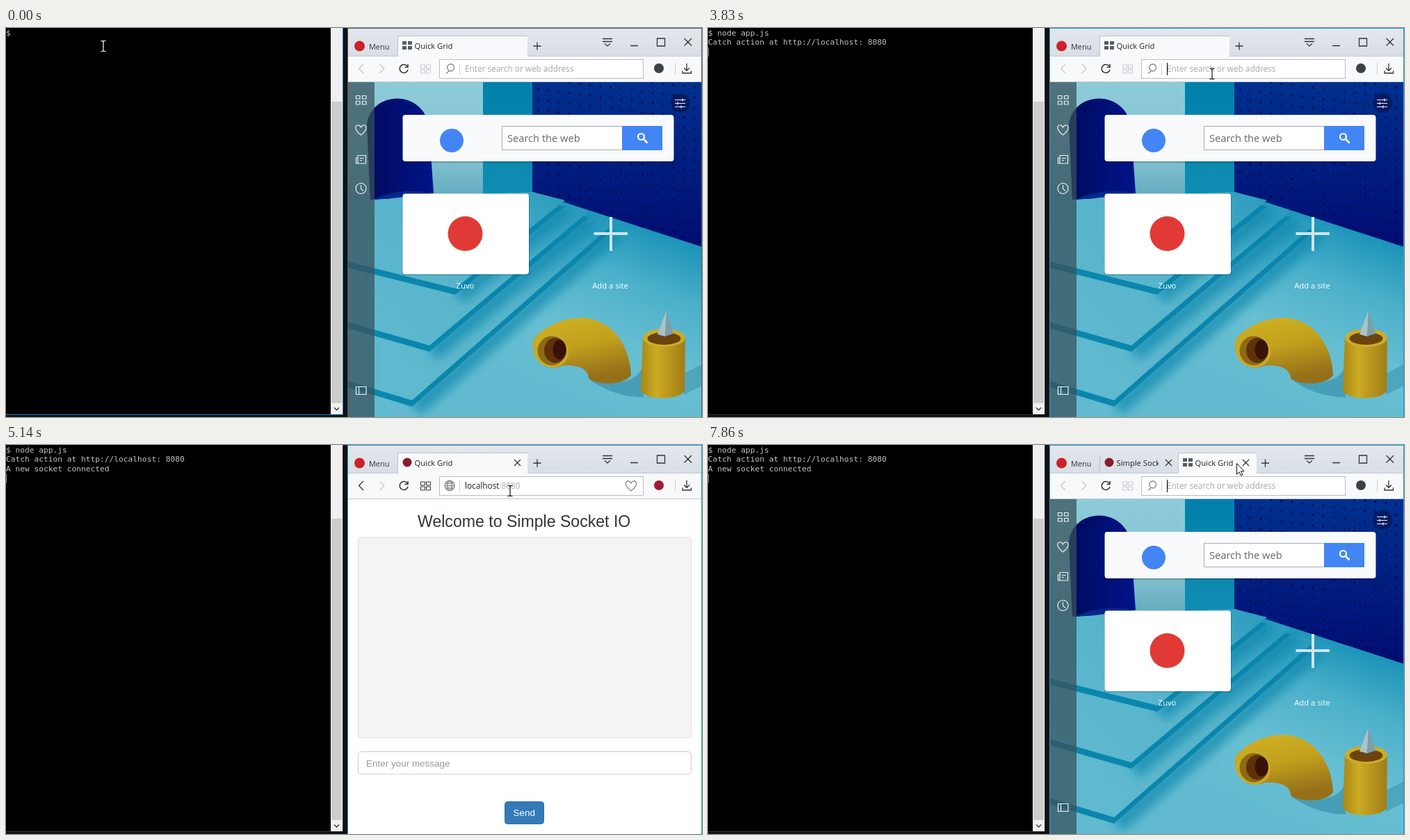
Write an HTML page that moves like this. It is 1001 by 560 pixels and loops after 8000 ms.

```html
<!DOCTYPE html>
<html lang="en">
<head>
<meta charset="utf-8">
<title>Simple Socket IO</title>
<style>
  html, body { margin: 0; width: 100%; height: 100%; overflow: hidden; background: #111; }
  svg { display: block; }
  text { font-family: "Open Sans", "Noto Sans", sans-serif; white-space: pre; }
  .mono { font: 11.23px "DejaVu Sans Mono", monospace; fill: #c4c4c4; }
  .tab { font-size: 11.2px; fill: #222; }
  .url { font-size: 11.8px; }
  .page text { font-family: "Liberation Sans", Arial, sans-serif; }
  .line { fill: none; stroke: #333; stroke-width: 1.3; }
  .side { fill: none; stroke: #e8f0f2; stroke-width: 1.2; }
</style>
</head>
<body>
<svg width="1001" height="560">
  <defs>
    <linearGradient id="bar" x2="0" y2="1"><stop stop-color="#e3e8ee"/><stop offset="1" stop-color="#d8dee5"/></linearGradient>
    <linearGradient id="floor" gradientUnits="userSpaceOnUse" x1="925" y1="285" x2="815" y2="560">
      <stop stop-color="#1b93b8"/><stop offset=".28" stop-color="#4bb0ca"/><stop offset=".6" stop-color="#68bfd2"/><stop offset="1" stop-color="#62bad0"/>
    </linearGradient>
    <linearGradient id="stair" gradientUnits="userSpaceOnUse" x1="800" y1="235" x2="560" y2="480">
      <stop stop-color="#2b9bbd"/><stop offset=".45" stop-color="#55b3cb"/><stop offset="1" stop-color="#5fb9cf"/>
    </linearGradient>
    <linearGradient id="wallPale" x2="0" y2="1"><stop stop-color="#8ecbd8"/><stop offset=".6" stop-color="#86c4d2"/><stop offset="1" stop-color="#5fa9bd"/></linearGradient>
    <linearGradient id="arch"><stop stop-color="#000a5c"/><stop offset="1" stop-color="#00148a"/></linearGradient>
    <linearGradient id="navy" x2="0" y2="1"><stop stop-color="#00308f"/><stop offset="1" stop-color="#000c72"/></linearGradient>
    <linearGradient id="teal" x2="0" y2="1"><stop stop-color="#0080aa"/><stop offset="1" stop-color="#108db1"/></linearGradient>
    <linearGradient id="gold" x2=".3" y2="1"><stop stop-color="#d0b224"/><stop offset=".5" stop-color="#c2a11d"/><stop offset="1" stop-color="#957019"/></linearGradient>
    <linearGradient id="can"><stop stop-color="#a88718"/><stop offset=".35" stop-color="#cbab22"/><stop offset="1" stop-color="#a17c18"/></linearGradient>
    <filter id="soft"><feGaussianBlur stdDeviation="7"/></filter>
    <pattern id="dots" width="15" height="15" patternUnits="userSpaceOnUse" patternTransform="translate(758 80) skewY(7)">
      <circle cx="7" cy="7" r="1.700" fill="#000a42"/>
    </pattern>
    <path id="grid" d="M0 0h6v5h-6zM8 0h6v5h-6zM0 7h6v5h-6zM8 7h6v5h-6z"/>
    <path id="lens" d="M-1.5 4A5 5 0 1 1 2 4.3 5 5 0 0 1 -1.5 4L-6 8" fill="none"/>
    <path id="heart" d="M0 7C-15 -4 -4 -12 0 -4C4 -12 15 -4 0 7z"/>
  </defs>

  <!-- terminal -->
  <rect width="484" height="556"/>
  <path d="M467 0h17v556h-17z" fill="#f0f0f0"/>
  <path d="M468 106h15v434h-15z" fill="#cdcdcd"/>
  <path d="M472 546.5l3.5 3.5 3.5-3.5" class="line" stroke-width="2"/>
  <path id="termEdge" d="M484.5 0V556.5H0" fill="none"/>
  <text class="mono" y="10.5" id="cmd"></text>
  <text class="mono" y="24" id="out">Catch action at http://localhost: 8080</text>
  <text class="mono" y="37.5" id="conn">A new socket connected</text>
  <rect id="termCaret" width="1" height="13"/>

  <!-- browser frame -->
  <rect x="491" width="510" height="560" fill="#fff"/>
  <rect x="491" width="510" height="41" fill="url(#bar)"/>
  <rect x="491" y="40" width="510" height="38" fill="#f8f9fb"/>
  <path d="M491 40.5h510M491 77.5h510" stroke="#c3c9cf"/>
  <circle cx="508.500" cy="26" r="7.500" fill="#cc2229"/>
  <text x="522" y="30.500" font-size="10.9" fill="#333">Menu</text>
  <rect id="hover" x="750" y="11" width="29" height="29" fill="#b7bec5"/>
  <svg id="tabA" x="563" y="11" height="30">
    <path d="M.5 4V27" stroke="#b5bcc4"/>
    <rect id="tabABack" x=".5" y=".5" width="100%" height="34" fill="#f8f9fb" stroke="#bcc3ca"/>
    <use href="#grid" x="7" y="8" fill="#555d63" id="tabAGrid"/>
    <circle cx="14" cy="14" r="6.500" fill="#8b1a2b" id="tabADot"/>
    <svg id="clipA" height="30"><text id="titleA" class="tab" x="24.500" y="19"></text></svg>
    <svg x="100%" overflow="visible" id="closeA"><path d="M-19 10l9 9m0-9l-9 9" class="line"/></svg>
  </svg>
  <svg id="tabB" y="11" height="30">
    <rect x=".5" y=".5" width="100%" height="34" fill="#f8f9fb" stroke="#bcc3ca"/>
    <use href="#grid" x="7" y="8" fill="#555d63"/>
    <text class="tab" x="24.500" y="19">Quick Grid</text>
    <svg x="100%" overflow="visible"><path d="M-20 10l9 9m0-9l-9 9" class="line"/></svg>
  </svg>
  <path id="plus" d="M-5.500 26h11M0 20.500v11" class="line"/>
  <path d="M858 15.500h14M858 19.500h14M861 22.500l4 3.500 4-3.500M898 25.500h11M936.500 15h11v11h-11zM975.500 15l10.500 10.500m0-10.500l-10.500 10.500" class="line"/>

  <!-- toolbar -->
  <path id="back" d="M514 52l-6.500 6.500 6.500 6.500" class="line"/>
  <path d="M537.500 52l6.500 6.500-6.500 6.500" class="line" style="stroke:#c6c9cc"/>
  <path d="M577 55A6 6 0 1 0 578 60M578 52v4.500h-4.500" class="line" style="stroke-width:1.5"/>
  <use id="toolGrid" href="#grid" x="596.500" y="53" fill="none"/>
  <rect x="623.500" y="45.500" width="293" height="27" fill="#fff" stroke="#b9bec3"/>
  <path d="M652.500 51v16M962.500 50v17" stroke="#ccd0d4"/>
  <g class="line" style="stroke:#80868b">
    <use id="icoLens" href="#lens" x="639" y="57.500"/>
    <g id="icoClock"><circle cx="638" cy="58.500" r="7"/><path d="M638 54v5h4"/></g>
    <g id="icoGlobe"><circle cx="638" cy="58.500" r="7"/><ellipse cx="638" cy="58.500" rx="3.300" ry="7"/><path d="M631 58.500h14M632 55h12M632 62h12"/></g>
    <use id="like" href="#heart" x="899" y="59"/>
  </g>
  <circle id="shield" cx="939" cy="58" r="7"/>
  <path d="M979 51v10M975 57.500l4 4 4-4M973 61.500v3.500h12.500v-3.500" class="line"/>
  <rect id="select" y="50" height="18" fill="#0094fb"/>
  <text class="url" x="660" y="63"><tspan id="urlA"></tspan><tspan id="urlB"></tspan></text>
  <rect id="urlCaret" x="660" y="50" width="1" height="18"/>

  <!-- start page -->
  <svg id="start" x="491" y="78" width="509" height="482" viewBox="491 78 509 482">
    <rect x="491" y="78" width="510" height="482" fill="url(#floor)"/>
    <path d="M491 78h196v160l-196 11z" fill="url(#wallPale)"/>
    <path d="M686 78h72v159l-72 4z" fill="url(#teal)"/>
    <path d="M524 249L519 140C523 92 595 86 608 138L615 238Q570 233 524 249z" fill="url(#arch)"/>
    <path d="M524 249Q566 228 615 238z" fill="#04288a"/>
    <path d="M757 78h244v237L757 236z" fill="url(#navy)"/>
    <path d="M764 78h237v237L764 238z" fill="url(#dots)"/>
    <g id="stairs"></g>
    <path d="M838 505Q900 520 915 490L917 532Q870 530 838 505z" fill="#2f87a0" opacity=".55"/>
    <path d="M970 500L1001 484V515L975 528z" fill="#2f87a0" opacity=".45"/>
    <path d="M760 446Q788 418 828 417C874 419 898 460 899 500C888 515 850 515 838 504C838 490 820 484 801 486Q788 492 774 486C758 474 755 458 760 446z" fill="url(#gold)"/>
    <ellipse cx="784" cy="464" rx="26" ry="24" fill="#c9aa26" transform="rotate(35 784 464)"/>
    <ellipse cx="785" cy="464.500" rx="20.500" ry="21" fill="#8f6a14"/>
    <ellipse cx="790" cy="464" rx="16" ry="18" fill="#5f3209"/>
    <ellipse cx="796" cy="463" rx="9.500" ry="14" fill="#381205"/>
    <path d="M916 446L913 522Q920 533 945 533Q971 532 976 522L977 446z" fill="url(#can)"/>
    <ellipse cx="946.500" cy="446" rx="30.500" ry="13" fill="#cbad28"/>
    <ellipse cx="946.500" cy="447" rx="24" ry="9" fill="#6d430d"/>
    <path d="M950 406L937 441 948 444z" fill="#a9c3ca"/>
    <path d="M950 406L948 444 960 440z" fill="#7d9ea8"/>
    <rect x="491" y="78" width="39" height="482" fill="#37525b" opacity=".73"/>
    <g class="side">
      <path d="M503.500 97.500h5.500v4.500h-5.500zM512.500 97.500h5.500v4.500h-5.500zM503.500 105.500h5.500v4.500h-5.500zM512.500 105.500h5.500v4.500h-5.500z"/>
      <use href="#heart" x="510.500" y="147"/>
      <path d="M506 183.500h11.500v11.500h-14v-8h2.500zM506 187v8M509 187.500h5.500M509 190.500h3"/>
      <circle cx="510.500" cy="231" r="7.500"/><path d="M510.500 226v5.500l3.500 3"/>
      <path d="M503.500 516.500h14.500v11h-14.500zM507.500 516.500v11"/>
    </g>
    <circle cx="970" cy="108" r="14" fill="#06164f" opacity=".65"/>
    <path class="side" d="M962 103.500h15M962 108.500h15M962 113.500h15M973 101.500v4M966 106.500v4M971 111.500v4"/>
    <rect x="570" y="126" width="391" height="68" rx="4" opacity=".22"/>
    <rect x="570.500" y="125" width="390" height="67" rx="4" fill="#f8fafc"/>
    <circle cx="641" cy="162" r="17" fill="#4285f4"/>
    <rect x="713.500" y="141.500" width="173" height="34" fill="#fff" stroke="#a9adb1"/>
    <text x="721" y="164" font-size="14.66" fill="#666">Search the web</text>
    <rect x="886" y="141" width="58" height="35" fill="#4285f4"/>
    <path d="M917.500 160.500l5 5" stroke="#fff" stroke-width="2.500"/><circle cx="913.500" cy="156.500" r="4.500" fill="none" stroke="#fff" stroke-width="2.200"/>
    <rect x="570" y="240" width="183" height="116" rx="4" opacity=".22"/>
    <rect x="570.500" y="238.500" width="181.500" height="116" rx="4" fill="#fff"/>
    <circle cx="660.500" cy="296" r="25" fill="#e13a36"/>
    <path d="M845.500 296h48.500M870 272v49" stroke="#cfe5ec" stroke-width="4"/>
    <g font-size="11.25" fill="#fff" text-anchor="middle"><text x="660.500" y="375">Zuvo</text><text x="869" y="375">Add a site</text></g>
  </svg>

  <!-- chat page -->
  <g id="chat" class="page">
    <rect x="491" y="78" width="510" height="482" fill="#fff"/>
    <text x="592" y="118" font-size="23.1" fill="#333">Welcome to Simple Socket IO</text>
    <rect x="506.500" y="133" width="479" height="288.500" rx="4" fill="#f4f4f4" stroke="#dfdfdf"/>
    <rect x="506.500" y="441.500" width="479" height="32.500" rx="4" fill="#fff" stroke="#ccc"/>
    <text x="518" y="462.500" font-size="13.48" fill="#999">Enter your message</text>
    <rect x="717.500" y="513.500" width="56" height="32" rx="4" fill="#337ab7" stroke="#2e6da4"/>
    <text x="729.500" y="534" font-size="13.48" fill="#fff">Send</text>
  </g>
  <path id="browserEdge" d="M491.500 560V.5H1000.500V560" fill="none"/>

  <g id="pointer">
    <path id="beam" d="M-3.500 -7.500H-1L0 -6.500 1 -7.500H3.500M0 -6.500V6.500M-3.500 7.500H-1L0 6.500 1 7.500H3.500" fill="none" stroke-width="1.200"/>
    <path id="arrow" d="M.5 .5V16L4 12.700 6.500 18 9 17 6.500 11.800H11z" fill="#fff" stroke="#111"/>
  </g>
</svg>
<script>
const $ = id => document.getElementById(id);
const set = (id, attrs) => { for (const k in attrs) $(id).setAttribute(k, attrs[k]); };
const show = (id, on) => { $(id).style.display = on ? '' : 'none'; };
const write = (id, s) => { if ($(id).textContent !== s) $(id).textContent = s; };

// stairs, lowest first: back corner, front corner, height at the left edge
$('stairs').innerHTML = [[872, 283, 584, 536, 508], [838, 264, 609, 457, 423], [804, 248, 646, 375, 336]]
  .map(([cx, cy, fx, fy, ly]) => {
    const d = `M491 249L757 236 ${cx} ${cy} ${fx} ${fy} 491 ${ly}z`;
    return `<path d="M${cx} ${cy}L${fx} ${fy}" stroke="#0787ae" stroke-width="22" opacity=".7" transform="translate(5 12)" filter="url(#soft)"/>
      <path d="${d}" fill="#0a86ad" transform="translate(0 9)"/><path d="${d}" fill="url(#stair)"/>`;
  }).join('');

const LOOP = 8000, CHAR = 6.76, COMMAND = 'node app.js', URL_TEXT = 'localhost:8080';
const KEYS = [80, 150, 230, 460, 550, 700, 860, 1010, 1180, 1410, 1480];
// time, x, y, shape
const MOVES = [[0, 140, 26, 'beam'], [80, 0, 0, ''], [3670, 725, 66, 'beam'],
  [6690, 738, 72, 'arrow'], [6770, 728, 50, 'beam'], [6860, 727, 57, 'beam'],
  [7010, 735, 46, 'arrow'], [7090, 745, 37, 'arrow'], [7160, 752, 30, 'arrow'],
  [7230, 757, 26, 'arrow'], [7380, 760, 26, 'arrow']];

function pointerAt(t) {
  if (t >= 2950 && t < 3670) {
    const p = Math.floor((t - 2950) / 80) / 9, e = p * p * (3 - 2 * p);
    const x = 140 + 585 * e;
    return [x, 26 + 40 * e, x < 467 ? 'beam' : 'arrow'];
  }
  return MOVES.filter(m => m[0] <= t).pop().slice(1);
}

function drawTerminal(t) {
  const typed = KEYS.filter(k => k <= t).length;
  const row = t < 1940 ? 0 : t < 2420 ? 1 : t < 4750 ? 2 : 3;
  const focus = t < 3670;
  write('cmd', '$ ' + COMMAND.slice(0, typed));
  show('out', row > 1);
  show('conn', row > 2);
  show('termCaret', typed);
  set('termCaret', { x: row ? 0 : Math.round((2 + typed) * CHAR), y: row ? 14.5 + 13.5 * (row - 1) : 1, fill: focus ? '#ddd' : '#8a8a8a' });
  set('termEdge', { stroke: focus ? '#1883c7' : '#333' });
}

function drawTabs(t, loaded, second) {
  const p = second ? Math.min(4, 1 + Math.floor((t - 7630) / 76)) / 4 : 0;
  const w = 186 - 73 * p;
  set('tabA', { width: w + 1 });
  set('clipA', { width: w - (loaded ? 28 : 5) });
  write('titleA', t < 5210 ? 'Quick Grid' : 'Simple Socket IO');
  show('tabABack', !second);
  show('tabAGrid', !loaded);
  show('tabADot', loaded);
  show('closeA', loaded);
  show('tabB', second);
  set('tabB', { x: 563 + w, width: 112 * p + 1 });
  set('plus', { transform: `translate(${764 + 37.5 * p})` });
  show('hover', t >= 7380 && !second);
}

function drawToolbar(t, onChat) {
  const letters = t < 4520 ? 0 : t < 4600 ? 1 : 2;
  const typing = letters && t < 5140;
  const cut = onChat ? 9 : letters;
  const filled = typing || onChat;
  write('urlA', filled ? URL_TEXT.slice(0, cut) : 'Enter search or web address');
  write('urlB', filled ? URL_TEXT.slice(cut) : '');
  set('urlA', { fill: filled ? '#222' : '#a4a8ab' });
  set('urlB', { fill: onChat ? '#aaa' : '#fff' });
  show('select', typing);
  const left = letters < 2 ? 663 : 670.5;
  set('select', { x: left, width: 740.5 - left });
  show('urlCaret', (t >= 3830 && t < 4370) || t >= 7860);
  show('icoLens', !filled);
  show('icoClock', typing);
  show('icoGlobe', onChat);
  show('like', onChat);
  const ink = onChat ? '#333' : '#c6c9cc';
  $('back').style.stroke = ink;
  set('toolGrid', { stroke: ink });
  set('shield', { fill: onChat ? '#a01c32' : '#3b4144' });
}

function draw(t) {
  const loaded = t >= 5140, second = t >= 7630, onChat = loaded && !second;
  drawTerminal(t);
  drawTabs(t, loaded, second);
  drawToolbar(t, onChat);
  show('start', !onChat);
  show('chat', onChat);
  set('browserEdge', { stroke: t < 3830 ? '#555b60' : '#1a9fdc' });
  const [x, y, shape] = pointerAt(t);
  show('beam', shape === 'beam');
  show('arrow', shape === 'arrow');
  set('beam', { stroke: x < 467 ? '#fff' : '#111' });
  set('pointer', { transform: `translate(${x} ${y})` });
}

const begin = performance.now();
function tick() {
  draw((performance.now() - begin) % LOOP);
  requestAnimationFrame(tick);
}
tick();
</script>
</body>
</html>
```
